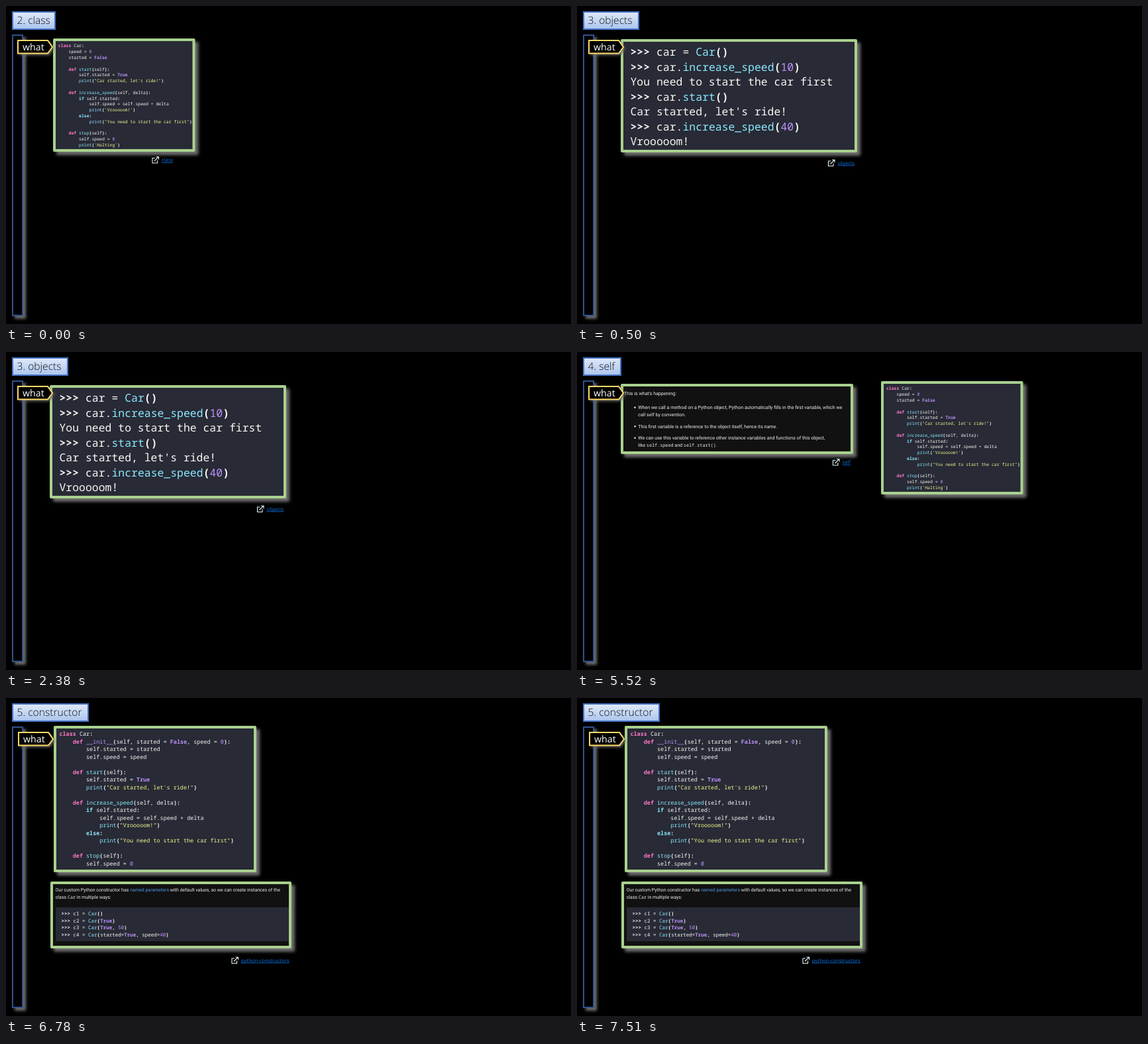
These frames come from a looping animation (853 px wide and 480 px high, 8000 ms). An HTML page with a canvas:

```html
<!DOCTYPE html>
<html lang="en">
<head>
<meta charset="utf-8">
<title>Python classes</title>
<style>
  html, body { margin: 0; height: 100%; overflow: hidden; background: #000; }
  canvas { display: block; }
</style>
</head>
<body>
<canvas width="853" height="480"></canvas>
<script>
const ctx = document.querySelector('canvas').getContext('2d');
const MONO = '"Noto Sans Mono", monospace';
const BODY = 'Roboto, sans-serif';
const SLIDE = '"Open Sans", "Noto Sans", sans-serif';
const PANEL = '#282a36', DARK = '#111', LINK = '#0a6fe0', WHITE = '#f8f8f2';
const PINK = '#ff79c6', CYAN = '#8be9fd', PURPLE = '#bd93f9', YELLOW = '#f1fa8c';

// Draws one run of text and returns the x where it ends.
function text(str, x, y, font, color) {
  ctx.font = font;
  ctx.fillStyle = color;
  ctx.fillText(str, x, y);
  return x + ctx.measureText(str).width;
}

const RULES = [
  [/^(".*?"|'.*?')/, YELLOW],
  [/^(class|def)\b/, PINK, 700],
  [/^(if|else)\b/, CYAN, 700],
  [/^(True|False)\b/, PURPLE, 700],
  [/^(__init__|\d+\b)/, PURPLE],
  [/^\w+(?=\()/, CYAN],
  [/^(>>>|[():]+)/, WHITE, 700],
  [/^(\w+|\s+|.)/, WHITE],
];

function code(source, x, y, advance, leading, plain) {
  const size = advance / 0.6;
  source.split('\n').forEach((line, row) => {
    for (let col = 0; col < line.length;) {
      const rest = line.slice(col);
      const output = plain && !line.startsWith('>>>');
      const [pattern, color, weight = 400] = output ? [/^.+/, WHITE] : RULES.find(r => r[0].test(rest));
      const token = rest.match(pattern)[0];
      text(token, x + col * advance, y + row * leading, `${weight} ${size}px ${MONO}`, color);
      col += token.length;
    }
  });
}

// Words in backticks are set in the monospaced font, words in brackets as a link.
function prose(str, x, y, size) {
  for (const part of str.split(/(`.*?`|\[.*?\])/)) {
    const isCode = part[0] === '`', isLink = part[0] === '[';
    const font = isCode ? `${size * 0.96}px ${MONO}` : `${size}px ${BODY}`;
    x = text(part.replace(/[`[\]]/g, ''), x, y, font, isLink ? '#4a9be8' : '#f0f0f0');
  }
}

function shadow(on, offset) {
  ctx.shadowColor = on ? '#6c6c6c' : 'transparent';
  ctx.shadowBlur = on ? 4 : 0;
  ctx.shadowOffsetX = ctx.shadowOffsetY = on ? offset : 0;
}

// A filled frame whose outer edges are the given coordinates.
function frame(l, t, r, b, fill, stroke = '#a9d18e', line = 4, radius = 2) {
  shadow(true, line > 2 ? 5 : 3.5);
  ctx.fillStyle = stroke;
  ctx.beginPath();
  ctx.roundRect(l, t, r - l, b - t, radius);
  ctx.fill();
  shadow(false);
  ctx.fillStyle = fill;
  ctx.fillRect(l + line, t + line, r - l - 2 * line, b - t - 2 * line);
}

function slide(title, right) {
  ctx.fillStyle = '#000';
  ctx.fillRect(0, 0, 853, 480);
  frame(9, 43, 26, 468, '#000', '#2f528f', 2, 0);

  const fill = ctx.createLinearGradient(0, 8, 0, 36);
  fill.addColorStop(0, '#e2ebf9');
  fill.addColorStop(1, '#a9c3ee');
  ctx.fillStyle = '#4472c4';
  ctx.fillRect(9, 8, right - 9, 28);
  ctx.fillStyle = fill;
  ctx.fillRect(11, 10, right - 13, 24);
  text(title, 16.5, 27, `300 15.6px ${SLIDE}`, '#111');
}

function tag(x) {
  ctx.beginPath();
  for (const [dx, y] of [[1, 52], [46, 52], [53, 62], [46, 71.5], [1, 71.5]]) ctx.lineTo(x + dx, y);
  ctx.closePath();
  ctx.fillStyle = '#000';
  ctx.strokeStyle = '#ffd966';
  ctx.lineWidth = 2;
  shadow(true, 2.5);
  ctx.fill();
  shadow(false);
  ctx.stroke();
  text('what', x + 8, 67, `14.2px ${SLIDE}`, '#fff');
}

function link(label, x, y) {
  ctx.strokeStyle = '#e4f4f6';
  ctx.lineWidth = 1.1;
  ctx.stroke(new Path2D(`M${x + 5} ${y + 2.5}h-4v7.5h7.5v-4M${x + 4} ${y + 7}l6 -6M${x + 6.5} ${y + 0.8}h4v4`));
  const end = text(label, x + 15, y + 8, `7.7px ${SLIDE}`, LINK);
  ctx.fillRect(x + 15, y + 9, end - x - 15, 0.8);
}

const METHODS = `
    def start(self):
        self.started = True
        print("Car started, let's ride!")

    def increase_speed(self, delta):
        if self.started:
            self.speed = self.speed + delta
            print('Vrooooom!')
        else:
            print("You need to start the car first")

    def stop(self):
        self.speed = 0`;

const CAR = `class Car:
    speed = 0
    started = False
${METHODS}
        print('Halting')`;

const CAR_INIT = `class Car:
    def __init__(self, started = False, speed = 0):
        self.started = started
        self.speed = speed
${METHODS.replace(/'Vrooooom!'/, '"Vrooooom!"')}`;

const SESSION = `>>> car = Car()
>>> car.increase_speed(10)
You need to start the car first
>>> car.start()
Car started, let's ride!
>>> car.increase_speed(40)
Vrooooom!`;

const CALLS = `>>> c1 = Car()
>>> c2 = Car(True)
>>> c3 = Car(True, 50)
>>> c4 = Car(started=True, speed=40)`;

function carPanel(x, y) {
  frame(x, y, x + 214.5, y + 171, PANEL);
  code(CAR, x + 8, y + 13.4, 3.88, 8.8);
}

const SLIDES = [
  [0, () => {
    slide('2. class', 75);
    carPanel(71, 49);
    tag(17);
    link('class', 220, 227);
  }],
  [500, () => {
    slide('3. objects', 94);
    frame(66, 50, 423, 221, PANEL);
    code(SESSION, 80.5, 75, 9.87, 22.5, true);
    tag(17);
    link('objects', 378.5, 231.5);
  }],
  [3640, () => {
    slide('4. self', 67);
    frame(66, 48, 417, 154, DARK);
    tag(17);
    prose("This is what's happening:", 71, 64.5, 7.1);
    [
      ['When we call a method on a Python object, Python automatically fills in the first variable, which we', 86],
      ['call self by convention.', 96.6],
      ['This first variable is a reference to the object itself, hence its name.', 114.5],
      ['We can use this variable to reference other instance variables and functions of this object,', 132],
      ['like `self.speed` and `self.start()`.', 142.6],
    ].forEach(([line, y]) => {
      prose(line, 92.3, y, 7.1);
      if (/^[A-Z]/.test(line)) {
        ctx.beginPath();
        ctx.arc(87.5, y - 2.2, 1.2, 0, 7);
        ctx.fill();
      }
    });
    link('self', 385.5, 161);
    carPanel(459, 44);
  }],
  [6780, () => {
    slide('5. constructor', 125);
    frame(72, 42, 378, 263, PANEL);
    code(CAR_INIT, 80.5, 57, 5.07, 11.5);
    tag(18);
    frame(67, 277, 431, 378, DARK);
    prose('Our custom Python constructor has [named parameters] with default values, so we can create instances of the', 74.7, 292, 7.03);
    prose('class `Car` in multiple ways:', 74.7, 302.5, 7.03);
    ctx.fillStyle = PANEL;
    ctx.fillRect(75, 316, 352, 51);
    code(CALLS, 83.5, 328.3, 4.51, 10.4);
    link('python-constructors', 340, 390.5);
  }],
];

ctx.textRendering = 'geometricPrecision';
function draw(now) {
  const time = now % 8000;
  SLIDES.findLast(([start]) => time >= start)[1]();
  requestAnimationFrame(draw);
}
draw(performance.now());
</script>
</body>
</html>
```
